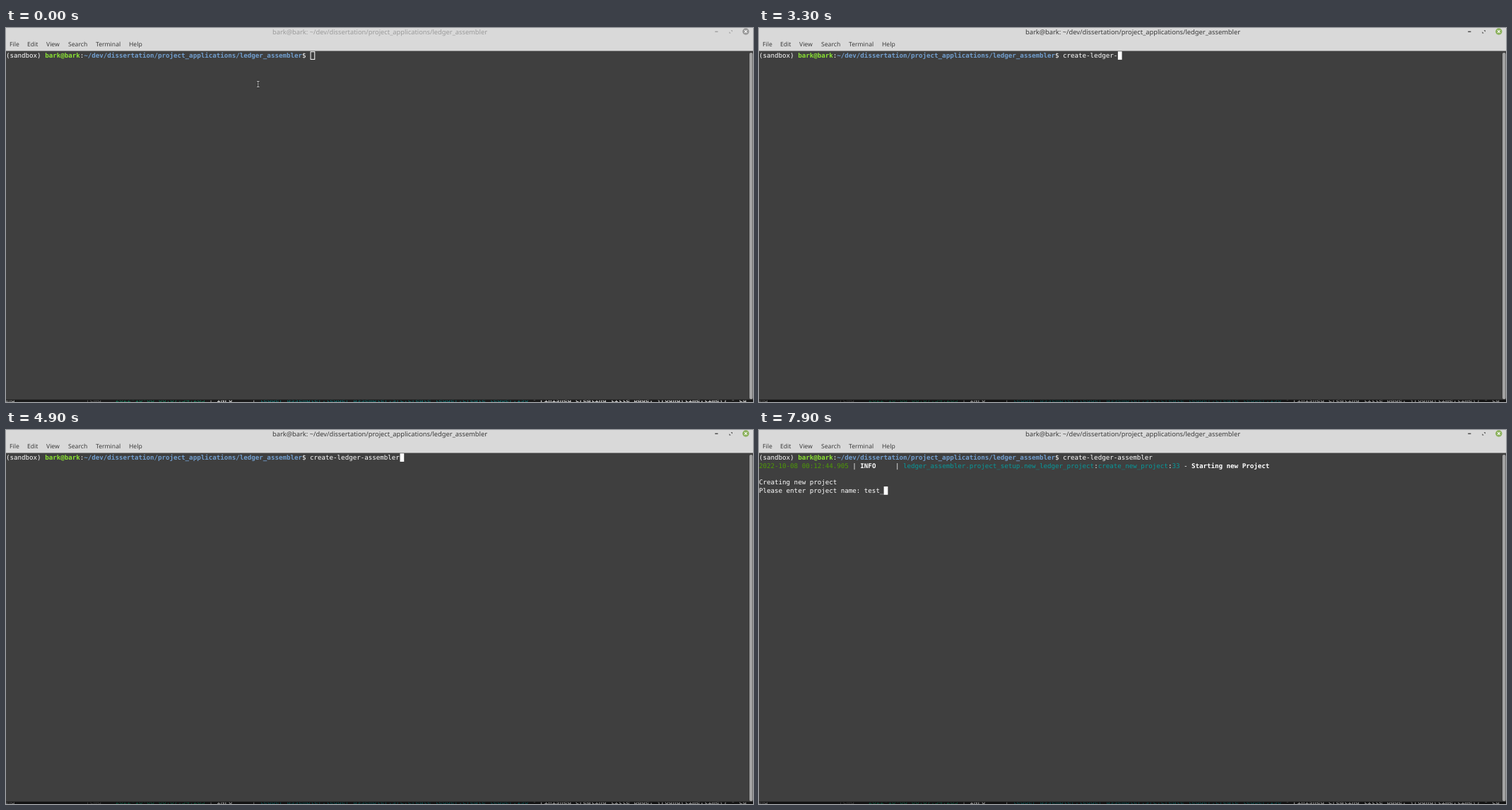
An HTML page that plays this animation: 1057 by 530 pixels, repeating every 8 s.

```html
<!DOCTYPE html>
<html lang="en">
<head>
<meta charset="utf-8">
<title>Terminal session</title>
<style>
  html, body { margin: 0; width: 100%; height: 100%; overflow: hidden; background: #3f3f3f; }
  svg { display: block; width: 1057px; height: 530px; }
  text { white-space: pre; text-rendering: geometricPrecision; }
  .mono { font: 9.17px "DejaVu Sans Mono", monospace; fill: #fff; }
  .code { font: 9.67px "DejaVu Sans Mono", monospace; fill: #d4d4d4; }
  .menu { font: 8.6px "Noto Sans", "Open Sans", sans-serif; fill: #3c3c3c; }
  .title { font: 500 9.3px "Noto Sans", "Open Sans", sans-serif; text-anchor: middle; }
  .b { font-weight: bold; }
  .user { fill: #8ae234; }
  .path { fill: #729fcf; }
  .date { fill: #4e9a06; }
  .mod { fill: #06989a; }
  .num { fill: #858585; }
  .fn { fill: #dcdcaa; }
  .str { fill: #ce9178; }
  .key { fill: #569cd6; }
  .var { fill: #9cdcfe; }
  .const { fill: #4fc1ff; }
  .type { fill: #4ec9b0; }
  .lit { fill: #b5cea8; }
  .par { fill: #ffd700; }
</style>
</head>
<body>
<svg viewBox="0 0 1057 530">
  <!-- Window behind, seen as a thin strip at the bottom -->
  <rect y="526" width="1057" height="4" fill="#1b1b1b"/>
  <g class="mono" opacity=".75">
    <text x="-4" y="530">and</text>
    <text x="113" y="530" fill="#777">[cmd</text>
    <text x="155" y="530"><tspan class="date" style="fill:#0d9a6c">2022-10-08 00:07:54.283</tspan> | <tspan class="b">INFO</tspan>     | <tspan class="mod">ledger_assembler.ledger_assembler.src.create_ledger:create_ledger:190</tspan> - <tspan class="b">Finished creating title page. {round(time.time() - cu</tspan></text>
  </g>
  <rect id="shade" y="526" width="1057" height="4" fill="#000" opacity=".35"/>

  <!-- Terminal window -->
  <rect width="1057" height="527" fill="#3f3f3f"/>
  <rect y="526.6" width="1057" height="1" fill="#151515"/>
  <rect width="1057" height="32.5" fill="#d9d9d9"/>
  <rect x="1052" y="35" width="4.5" height="491" rx="2" fill="#a3a3a3"/>
  <g id="bar">
    <text class="title" x="529" y="9" fill="currentColor">bark@bark: ~/dev/dissertation/project_applications/ledger_assembler</text>
    <path d="M1003.2 5.2h4.2" stroke="currentColor" stroke-width="1.3"/>
    <path d="M1025.6 3.2h2.2v2.2zM1023.4 5.2v2.2h2.2z" fill="currentColor"/>
    <circle id="close" cx="1046.8" cy="5" r="4.7"/>
    <path d="M1045 3.2l3.6 3.6m0-3.6l-3.6 3.6" stroke="#fff" stroke-width="1.1"/>
  </g>
  <g class="menu">
    <text x="5" y="26">File</text>
    <text x="30" y="26">Edit</text>
    <text x="57" y="26">View</text>
    <text x="88" y="26">Search</text>
    <text x="127" y="26">Terminal</text>
    <text x="174" y="26">Help</text>
  </g>

  <!-- Torn strip of an editor flashing over the title bar -->
  <g id="tear">
    <clipPath id="torn">
      <path d="M11 0L26 9H177V6H181V13H330V14H357V19H369V14.5H380V19H402V14.5H413V19H434V14.5H445V19H468V14.5H480V19H501V15H512V19H534V23H557V25H568V23H591V25H601V23H667V19.5H711V27H733V29H744V25H755V29H778V25H799V29H822V25H844V29H866V25H888V29H1057V0Z"/>
    </clipPath>
    <g clip-path="url(#torn)" class="code">
      <rect width="1057" height="30" fill="#1e1e1e"/>
      <rect width="142" height="30" fill="#252526"/>
      <path d="M190.5 0V14M213.5 0V14M682.5 0V20" stroke="#404040"/>
      <path d="M689.5 0V4M689.5 15V22" stroke="#3a8fd0" stroke-width="3"/>
      <text x="6" y="1">_structure.py</text>
      <text class="num" x="154" y="11">206</text>
      <text x="236" y="11"><tspan class="var">pdf</tspan>.<tspan class="fn">image</tspan><tspan class="par">(</tspan><tspan class="key">f</tspan><tspan class="str">"</tspan><tspan class="key">{</tspan> <tspan class="type">os</tspan>.<tspan class="type">path</tspan>.<tspan class="fn">join</tspan>(<tspan class="const">IMAGES_PATH</tspan> ,<tspan class="str">'back.png'</tspan>)<tspan class="key">}</tspan><tspan class="str">"</tspan>, <tspan class="var">x</tspan>=<tspan class="lit">0</tspan>, <tspan class="var">y</tspan>=<tspan class="lit">0</tspan>, <tspan class="var">h</tspan>=<tspan class="lit">300</tspan><tspan class="par">)</tspan></text>
      <text class="num" x="710" y="7.5">25</text>
      <text class="num" x="710" y="20.5">26</text>
      <text x="740" y="6.5">.tmp</text>
      <text x="740" y="20">data</text>
    </g>
  </g>

  <!-- Terminal text -->
  <g class="mono">
    <text x="0" y="42">(sandbox) <tspan class="b user">bark@bark</tspan>:<tspan class="b path">~/dev/dissertation/project_applications/ledger_assembler</tspan>$ <tspan id="command"></tspan></text>
    <g id="output">
      <text x="0" y="53.7"><tspan class="date">2022-10-08 00:12:44.905</tspan> | <tspan class="b">INFO</tspan>     | <tspan class="mod">ledger_assembler.project_setup.new_ledger_project</tspan>:<tspan class="mod">create_new_project</tspan>:<tspan class="mod">33</tspan> - <tspan class="b">Starting new Project</tspan></text>
      <text x="0" y="77.2">Creating new project</text>
      <text x="0" y="88.9">Please enter project name: <tspan id="answer"></tspan></text>
    </g>
  </g>
  <rect id="cursor" stroke="#fff"/>
  <g id="pointer" fill="none">
    <path d="M355 75.5h3.6M355 83.5h3.6M356.8 75.5v8" stroke="#111" stroke-width="2"/>
    <path d="M355 75.5h3.6M355 83.5h3.6M356.8 75.5v8" stroke="#eee" stroke-width=".8"/>
  </g>
</svg>
<script>
const LOOP = 8000, CELL = 5.52, LINE = 11.72, TOP = 33.2;
const COMMAND = "create-ledger-assembler", ANSWER = "test_";
const COMMAND_COL = 78, ANSWER_COL = 27;
const commandKeys = [900, 1200, 1300, 1400, 1500, 1600, 2000, 2200, 2300, 2400, 2600, 2600,
  2900, 3300, 3600, 3700, 3900, 4200, 4300, 4600, 4700, 4800, 4900];
const answerKeys = [6900, 7100, 7200, 7300, 7900];

const el = id => document.getElementById(id);
const show = (id, on) => el(id).style.display = on ? "" : "none";
const within = (t, from, to) => t >= from && t < to;
const typed = (keys, t) => keys.filter(k => k <= t).length;

function placeCursor(col, row, solid) {
  const inset = solid ? 0 : 0.5;
  const box = {
    x: col * CELL + inset, y: TOP + row * LINE + inset,
    width: CELL + 0.2, height: LINE - 2 * inset,
    fill: solid ? "#fff" : "none", "stroke-width": solid ? 0 : 1
  };
  for (const name in box) el("cursor").setAttribute(name, box[name]);
}

function draw(t) {
  const focused = t >= 300;
  const commandLength = typed(commandKeys, t), answerLength = typed(answerKeys, t);

  el("bar").style.color = focused ? "#3a3a3a" : "#9b9b9b";
  el("close").setAttribute("fill", focused ? "#8bb15c" : "#999");
  show("shade", focused);
  show("pointer", t < 900);
  show("tear", within(t, 3600, 3700));
  show("output", t >= 5600);
  show("cursor", !within(t, 5800, 6400));

  el("command").textContent = COMMAND.slice(0, commandLength);
  el("answer").textContent = ANSWER.slice(0, answerLength);

  if (t < 5300) placeCursor(COMMAND_COL + commandLength, 0, focused);
  else if (t < 5600) placeCursor(0, 1, true);
  else placeCursor(ANSWER_COL + answerLength, 4, true);
}

const start = performance.now();
function tick() {
  draw((performance.now() - start) % LOOP);
  requestAnimationFrame(tick);
}
tick();
</script>
</body>
</html>
```
